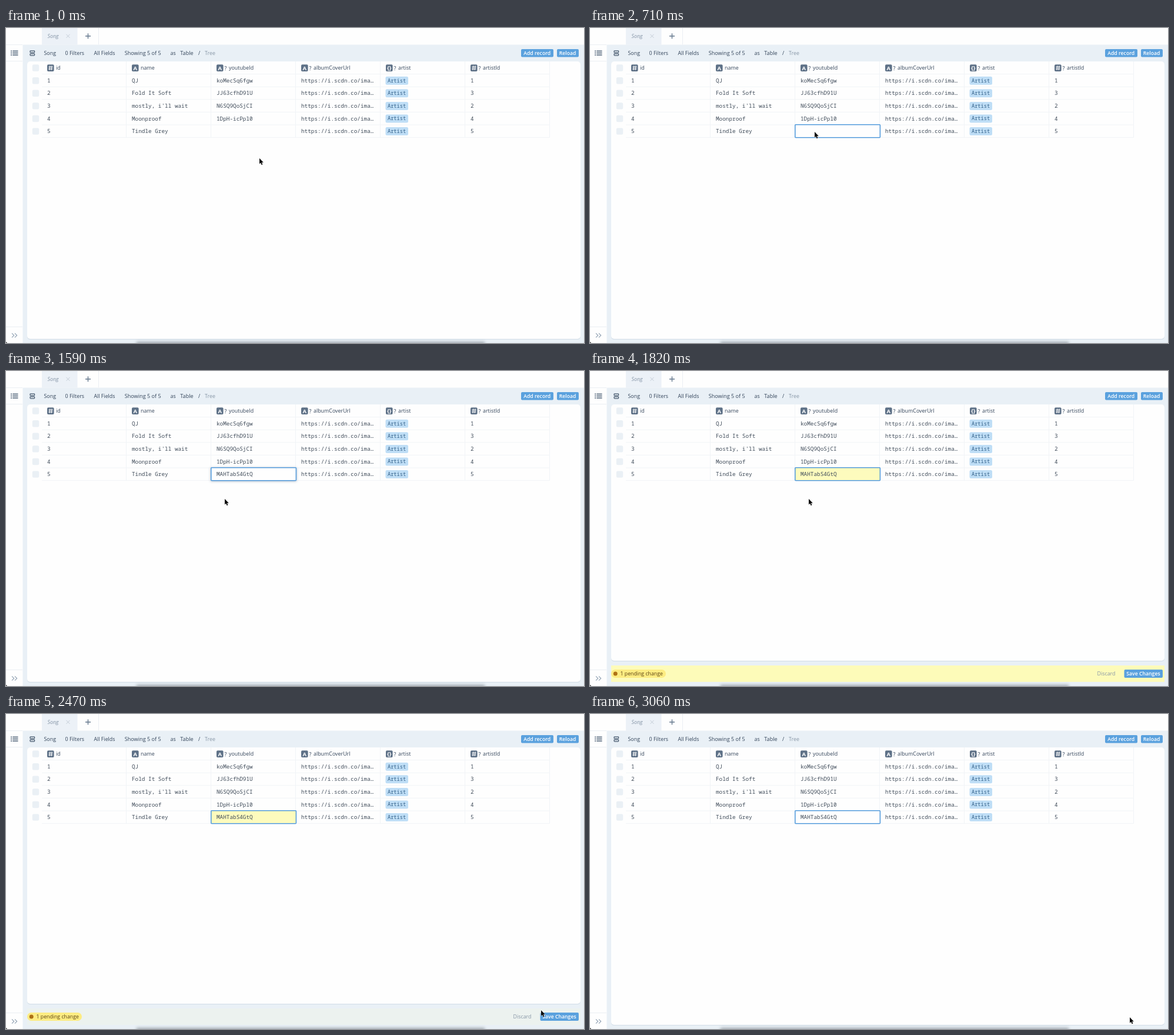
An HTML page that plays this animation: 983 px wide and 537 px high, repeating every 4530 ms.

```html
<!DOCTYPE html>
<html lang="en">
<head>
<meta charset="utf-8">
<title>Song table</title>
<style>
  html, body { margin: 0; width: 100%; height: 100%; overflow: hidden; background: #fefefe; }
  svg { display: block; width: 983px; height: 537px; }
  text { font: 500 8.9px "Open Sans", "Noto Sans", sans-serif; fill: #33445a; white-space: pre; }
  .big { font-size: 9.15px; }
  .tab { font-style: italic; font-weight: 400; fill: #8796a8; }
  .soft { fill: #8796a6; font-weight: 400; }
  .bold { font-weight: 600; font-size: 8.7px; fill: #fff; }
  .pill { font-size: 8.75px; fill: #5c4513; }
  .cell { font: 400 9.36px "Noto Sans Mono", "DejaVu Sans Mono", monospace; fill: #414d5b; }
  .badge { font: 400 8.64px "Noto Sans Mono", "DejaVu Sans Mono", monospace; fill: #315f88; }
  .glyph { font-size: 9.5px; font-weight: 700; fill: #fff; text-anchor: middle; }
  .line { fill: none; stroke: #687a8e; stroke-width: 1.2; }
</style>
</head>
<body>
<svg id="stage" viewBox="0 0 983 537" xmlns="http://www.w3.org/2000/svg">
  <defs>
    <filter id="glow" x="-10%" y="-60%" width="120%" height="220%"><feGaussianBlur stdDeviation="2"/></filter>
    <filter id="dock" x="-5%" y="-200%" width="110%" height="500%"><feGaussianBlur stdDeviation="2.6"/></filter>
  </defs>
  <rect width="983" height="537" fill="#fefefe"/>
  <rect x="28.5" y="28.5" width="955" height="509" fill="#e9f0f6"/>
  <rect x="61" width="60.5" height="28.5" fill="#ecf1f7"/>
  <path d="M0 28.5H28M0 56.5H28M0 509.5H28M157.5 0V28" fill="none" stroke="#ebeff3"/>
  <path d="M102.5 10.8l6 6m0-6l-6 6" class="line" style="stroke:#c3ccd6;stroke-width:1"/>
  <path d="M135 13.7h9m-4.5-4.5v9" class="line" style="stroke:#65788d;stroke-width:1.4"/>
  <path d="M8 38.8h2m1.2 0h9.3M8 41.3h2m1.2 0h9.3M8 43.8h2m1.2 0h9.3M8 46.3h2m1.2 0h9.3" class="line" style="stroke:#53667b"/>
  <path d="M10 520.3l3.6 3.7-3.6 3.7m5-7.4l3.6 3.7-3.6 3.7" class="line" style="stroke:#94a4b5"/>
  <g class="line" style="stroke:#44576c">
    <rect x="41" y="38.8" width="7.6" height="3" rx=".8"/>
    <rect x="41" y="43.8" width="7.6" height="3" rx=".8"/>
  </g>
  <rect id="panelShade" x="36" y="57.5" width="941" rx="5" fill="#c9d6e2" opacity=".7"/>
  <rect id="panel" x="36" y="57" width="941" rx="5" fill="#fefefe"/>
  <g id="table"></g>
  <g id="focus">
    <rect id="focusGlow" x="348" y="165" width="146" height="23" fill="#5b7690" opacity=".5" filter="url(#glow)"/>
    <rect id="focusBox" x="348.8" y="164.7" width="144.6" height="22" rx="1" stroke="#559cdc" stroke-width="1.6"/>
  </g>
  <text id="value" class="cell" x="358" y="179.2">MAHTabS4GtQ</text>
  <path id="caret" d="M0 170v11.5" stroke="#222" stroke-width=".9"/>
  <g id="pending">
    <rect id="flash" x="36" y="502" width="941" height="28" fill="#fdfbb9"/>
    <rect x="36" y="509" width="93" height="14" rx="7" fill="#fdec82"/>
    <circle cx="43.2" cy="516" r="3.5" fill="#ae7115"/>
    <text class="pill" x="51.5" y="519.2">1 pending change</text>
    <text class="soft" x="862.5" y="519.2">Discard</text>
    <rect id="save" x="908.5" y="509" width="65.5" height="14" rx="2"/>
    <text class="bold" x="912.3" y="519.2">Save Changes</text>
  </g>
  <rect x="222" y="535" width="592" height="10" fill="#3d4650" opacity=".42" filter="url(#dock)"/>
  <path d="M0 534.5V537H2.5Q.5 536.5 0 534.5Z" fill="#111"/>
  <g id="pointer">
    <path id="arrow" d="M0 0V9.8L2.2 7.8L3.7 11.4L5.4 10.6L3.9 7.2H6.9Z" fill="#0b0b0b" stroke="#fff" stroke-width=".8" paint-order="stroke"/>
    <path id="beam" d="M-2.5-5.3Q0-5.3 0-4Q0-5.3 2.5-5.3M0-4V4M-2.5 5.3Q0 5.3 0 4Q0 5.3 2.5 5.3" fill="none" stroke="#222" stroke-width="1"/>
    <path id="hand" d="M-.3 1Q.8-.5 1.9 1V4.2Q3-.0 3.8 4.3Q4.9 3.6 5.3 4.9Q6.7 4.4 6.7 6V8L5.6 11.5H.7L-2.6 7Q-2.7 5.4-.3 6.7Z" fill="#fff" stroke="#111" stroke-width=".9" stroke-linejoin="round"/>
  </g>
</svg>
<script>
const $ = id => document.getElementById(id);
const stage = $('stage'), table = $('table');

function add(parent, tag, attrs, content) {
  const node = document.createElementNS('http://www.w3.org/2000/svg', tag);
  for (const key in attrs) node.setAttribute(key, attrs[key]);
  if (content) node.textContent = content;
  parent.appendChild(node);
  return node;
}
const label = (x, y, content, cls = '') => add(table, 'text', { x, y, class: cls }, content);
const box = (x, y, width, height, rx, fill) => add(table, 'rect', { x, y, width, height, rx, fill });

// Toolbar
label(70.5, 17.2, 'Song', 'tab');
label(64.5, 45.6, 'Song');
label(100.6, 45.9, '0 Filters');
label(149.4, 45.9, 'All Fields');
label(201.7, 45.6, 'Showing 5 of 5', 'big');
label(279.5, 45.6, 'as');
label(296.3, 45.6, 'Table', 'big');
label(327, 45.6, '/');
label(338, 45.6, 'Tree', 'soft');
box(876, 36, 55, 13.5, 2, '#5aa1de');
label(880.2, 45.6, 'Add record', 'bold');
box(937, 36, 37, 13.5, 2, '#5aa1de');
label(940.8, 45.6, 'Reload', 'bold');

// Grid
const pitch = 21.6, colX = i => 61 + 144 * i;
let grid = '';
for (let i = 1; i < 7; i++) grid += `M${colX(i) - .5} 57V187`;
for (let i = 0; i < 6; i++) grid += `M61 ${78.6 + pitch * i}H924.5`;
add(table, 'path', { d: grid, stroke: '#f1f4f7', fill: 'none' });

const columns = [['#', 'id'], ['A', 'name'], ['A', 'youtubeId', 1], ['A', 'albumCoverUrl', 1], ['{}', 'artist', 1], ['#', 'artistId', 1]];
columns.forEach(([kind, name, optional], i) => {
  const x = colX(i) + 9;
  box(x, 62.3, 11.6, 11.6, 2, '#5e7187');
  if (kind === '#') {
    add(table, 'path', { d: `M${x + 2.3} 66.5h7.2m-7.4 3.3h7.2M${x + 4.8} 64.3l-.8 7.6m4-7.6l-.8 7.6`, stroke: '#fff', 'stroke-width': 1.1 });
  } else {
    label(x + 5.8, kind === 'A' ? 71.6 : 71, kind, 'glyph');
  }
  if (optional) label(x + 13.6, 71.6, '?', 'big');
  label(x + (optional ? 21 : 15), 71.4, name);
});

const songs = [
  ['QJ', 'koMecSq6fgw', 1],
  ['Fold It Soft', 'JJ63cfhD91U', 3],
  ["mostly, i'll wait", 'N6SQ9QoSjCI', 2],
  ['Moonproof', '1DpH-icPpl0', 4],
  ['Tindle Grey', '', 5]
];
box(44.8, 62.3, 11.4, 11.4, 2.5, '#eaf0f5');
songs.forEach(([name, video, artist], row) => {
  const mid = 89.7 + pitch * row, base = mid + 3.1;
  box(44.8, mid - 5.7, 11.4, 11.4, 2.5, '#eaf0f5');
  const cells = [String(row + 1), name, video, 'https://i.scdn.co/ima…', '', String(artist)];
  cells.forEach((content, i) => content && label(colX(i) + 9, base, content, 'cell'));
  box(645.5, mid - 7, 38.5, 14, 2.5, '#bfdef6');
  label(649, mid + 2.9, 'Artist', 'badge');
});

// Timeline, counted in ticks of 1/17 s
const LOOP = 4530;
const path = [
  [0, 431, 222], [1, 430, 218], [3, 419, 194], [5, 409, 180], [6, 407, 178],
  [9, 407, 178], [10, 398, 178], [11, 387, 177], [12, 382, 177],
  [23, 382, 177], [24, 381, 184], [25, 377, 200], [26, 373, 213], [27, 372, 218],
  [32, 372, 218], [34, 510, 300], [36, 760, 435], [38, 890, 501], [39, 906, 505],
  [42, 910, 505], [44, 915, 513], [47, 918, 517], [52, 918, 517]
];

function pointerAt(tick) {
  const next = path.findIndex(p => p[0] > tick);
  if (next < 0) return path[path.length - 1].slice(1);
  const [t0, x0, y0] = path[next - 1], [t1, x1, y1] = path[next];
  const k = (tick - t0) / (t1 - t0);
  return [x0 + (x1 - x0) * k, y0 + (y1 - y0) * k];
}

const show = (id, on) => $(id).setAttribute('visibility', on ? 'visible' : 'hidden');
const set = (id, key, value) => $(id).setAttribute(key, value);

function draw(time) {
  const tick = Math.floor((time % LOOP + 5) * .017);
  const within = (from, to) => tick >= from && tick < to;
  const pending = within(31, 52), editing = within(16, 31);

  const height = pending ? 437 : 473;
  set('panel', 'height', height);
  set('panelShade', 'height', height + .6);

  show('focusBox', tick >= 6);
  set('focusBox', 'fill', pending ? '#fdfbbd' : '#fefefe');
  show('focusGlow', editing);
  show('value', tick >= 21);
  show('caret', within(16, 24));
  set('caret', 'transform', `translate(${tick < 21 ? 358 : 420.3} 0)`);

  set('pending', 'display', pending ? 'inline' : 'none');
  const fade = Math.min(1, Math.max(0, (tick - 31) / 17));
  set('flash', 'opacity', (1 - fade) ** 2.1);
  set('save', 'fill', tick >= 49 ? '#3174b3' : tick >= 44 ? '#4489c8' : '#5aa1de');

  const hand = within(44, 52), beam = within(16, 21) || tick === 24;
  show('hand', hand);
  show('beam', beam);
  show('arrow', !hand && !beam && !within(21, 24));
  set('pointer', 'transform', `translate(${pointerAt(tick).join(' ')})`);
}

const start = performance.now();
function loop() {
  draw(performance.now() - start);
  requestAnimationFrame(loop);
}
loop();
</script>
</body>
</html>
```
